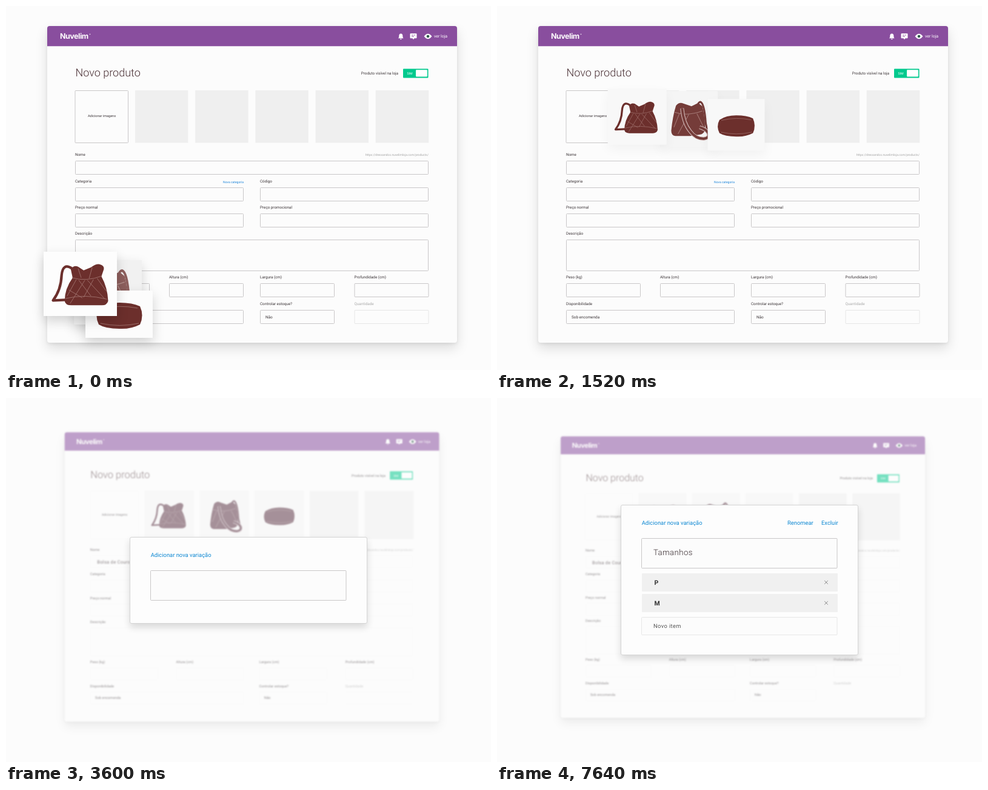
Recreate the animation shown at these times as an HTML page. Size 800x600 px, loop 8 s.

```html
<!DOCTYPE html>
<html lang="pt">
<head>
<meta charset="utf-8">
<title>Novo produto</title>
<style>
html, body { margin: 0; width: 100%; height: 100%; overflow: hidden; background: #fcfcfc; }
#stage { position: absolute; left: 0; top: 0; width: 800px; height: 600px; overflow: hidden; background: #fcfcfc; }
#form, #ui, #modal { position: absolute; left: 0; top: 0; width: 800px; height: 600px; }
#form { transform-origin: 402px 305px; }
#win { position: absolute; left: 68px; top: 33px; width: 676px; height: 522px; border-radius: 4px;
  background: #fcfcfc; box-shadow: 0 9px 20px rgba(0,0,0,.13), 0 2px 5px rgba(0,0,0,.07); }
svg { display: block; overflow: visible; }
text { font-family: Roboto, Arial, sans-serif; text-rendering: geometricPrecision; white-space: pre; }
.field { stroke-opacity: var(--line, 1); }
.card { position: absolute; left: 0; top: 0; }
.card svg { position: absolute; left: 50%; top: 50%; transform: translate(-50%, -50%); }
#panel { position: absolute; left: 204px; width: 390px; border: 1px solid #d4d4d4; border-radius: 3px;
  background: #fdfdfd; box-shadow: 0 6px 12px rgba(0,0,0,.14); }
#panel svg { position: absolute; left: -205px; top: -1px; }
</style>
</head>
<body>
<div id="stage">
  <div id="form">
    <div id="win"></div>
    <svg id="ui" viewBox="0 0 800 600"></svg>
  </div>
  <div id="modal"><div id="panel"></div></div>
</div>
<script>
const LOOP = 8000, STEP = 40;
const $ = id => document.getElementById(id);
const clamp = v => Math.min(1, Math.max(0, v));
const span = (t, a, b) => clamp((t - a) / (b - a));
const mix = (a, b, k) => a + (b - a) * k;
const inOut = (k, p) => k < .5 ? (2 * k) ** p / 2 : 1 - (2 - 2 * k) ** p / 2;
const sine = k => (1 - Math.cos(Math.PI * k)) / 2;

const text = (x, y, s, size = 6.3, fill = '#3c3538', more = '') =>
  `<text x="${x}" y="${y}" font-size="${size}" fill="${fill}" ${more}>${s}</text>`;
const rect = (x, y, w, h, fill, more = '') =>
  `<rect x="${x}" y="${y}" width="${w}" height="${h}" fill="${fill}" ${more}/>`;
const field = (x, y, w, h, line = '#c9c7c8') =>
  rect(x + .5, y + .5, w - 1, h - 1, '#fcfcfc', `class="field" rx="1" stroke="${line}"`);
const END = 'text-anchor="end"', MID = 'text-anchor="middle"';

// Form
const slotX = i => 113.7 + 99.2 * i;
function header() {
  return `<path d="M68 66.300V37q0-4 4-4h668q4 0 4 4v29.300z" fill="#894e9e"/>` +
    `<text x="89" y="54.2" font-size="12.5" font-weight="700" fill="#fff" letter-spacing="-.5" style="font-family:Inter,sans-serif">Nuvelim</text>` +
    `<circle cx="138.5" cy="46.5" r=".8" fill="#fff"/>` +
    `<path d="M647 53.3q1.300-1.300 1.300-4.300 0-3.500 3-3.500t3 3.500q0 3 1.300 4.300zM649.800 54h3q-.3 1.200-1.500 1.200t-1.500-1.200z" fill="#fff"/>` +
    `<path d="M667.500 45.300h9q1 0 1 1v6q0 1-1 1h-3l-1.500 2-1.500-2h-3q-1 0-1-1v-6q0-1 1-1z" fill="#fff"/>` +
    `<path d="M669 48h2.500M672.500 48h2.500M669 50.200h4" stroke="#894e9e" stroke-width=".9"/>` +
    `<path d="M689.500 50q6.500-8.500 13 0-6.500 8.500-13 0z" fill="#fff"/><circle cx="696" cy="50" r="2.300" fill="#2f5a4c"/>` +
    text(706, 52.3, 'ver loja', 6.9, '#fff');
}
function form() {
  let s = header() + text(114.5, 116, 'Novo produto', 18, '#4a3035', 'font-weight="300"') +
    text(647, 113, 'Produto visível na loja', 6.3, '#3c3538', END) +
    rect(655, 103.5, 41.5, 15, '#00c98d', 'rx="1"') + rect(676, 105.2, 18.9, 11.4, '#fff', 'rx="1"') +
    text(666, 113, 'SIM', 5.2, '#fff', MID) +
    field(113.5, 139, 88.5, 87) + text(158, 183, 'Adicionar imagens', 5.55, '#3c3538', MID);
  for (let i = 1; i < 6; i++) s += rect(slotX(i), 139, 87.5, 86.5, '#efefef');
  [[114, 246.8, 'Nome'], [114, 290.8, 'Categoria'], [419, 290.8, 'Código'], [114, 334, 'Preço normal'],
   [419, 334, 'Preço promocional'], [114, 377, 'Descrição'], [114, 449.2, 'Peso (kg)'],
   [269, 449.2, 'Altura (cm)'], [419, 449.2, 'Largura (cm)'], [574.5, 449.2, 'Profundidade (cm)'],
   [114, 492.8, 'Disponibilidade'], [419, 492.8, 'Controlar estoque?']].forEach(a => s += text(...a));
  s += text(574.5, 492.8, 'Quantidade', 6.3, '#aaa') +
    text(697, 247, 'https://dressandco.nuvelimloja.com/products/', 5.02, '#a3a3a3', END) +
    text(392, 291.6, 'Nova categoria', 5.05, '#1580d8', END);
  s += field(114, 255, 583, 23) + field(114, 385, 583, 52);
  for (const x of [114, 419]) for (const y of [299, 342]) s += field(x, y, 278, 23);
  for (const x of [114, 269, 419, 574.5]) s += field(x, 457, 123, 23);
  s += field(114, 501, 278, 23) + field(419, 501, 123, 23) + field(574.5, 501, 123, 23, '#e6e6e6');
  return s + text(123, 514.5, 'Sob encomenda', 6.4) + text(428, 514.5, 'Não', 6.4) +
    text(126.5, 269.8, '', 8.4, '#33262a', 'id="name" letter-spacing=".25"');
}
$('ui').innerHTML = form();

// Bags
const BROWN = '#6c2f2c', SEAM = 'fill="none" stroke="#a0726e" stroke-width=".9"';
const strap = (d, w, color = BROWN) =>
  `<path d="${d}" fill="none" stroke="${color}" stroke-width="${w}" stroke-linejoin="round"/>`;
const shape = d => `<path d="${d}" fill="${BROWN}"/>`;
const bucket = strap('M35 9Q20-1 18 20Q17 44 4 61L25 60', 4.2) +
  shape('M23 62Q23 42 36 24L33 10Q38 3 45 6L54 12 66 7Q74 1 80 2 88 4 87 10L83 22Q93 40 94 62 92 69 84 69L34 69Q24 69 23 62z') +
  `<path d="M35 24Q58 31 84 21M42 27L27 54M56 28L32 66M70 27L54 56M46 28L66 54M60 28L88 58M76 25L91 46M30 44L52 57M24 58Q56 50 92 59M45 9L50 24M68 7L63 25" ${SEAM}/>`;
const LOOP_STRAP = 'M16 12Q18 34 28 46 36 57 48 57 57 56 55 49 52 43 42 40';
const sling = strap('M36 30Q37 3 43 2.500 49 4 51 34L54 48', 3) +
  shape('M7 8Q12 2 18 5L30 9 40 4 46 9Q50 24 50 43 49 50 42 51L28 53 6 53Q0 52 0 45 2 24 7 8z') +
  `<path d="M5 18Q25 24 46 16M12 20L4 40M26 21L10 50M38 20L48 40" ${SEAM}/>` +
  strap(LOOP_STRAP, 5.4, '#d3b9b7') + strap(LOOP_STRAP, 3.6);
const barrel = shape('M4 9Q18 0 38 0 60 0 72 6 79 21 72 36 57 44 38 43 15 43 4 36-3 22 4 9z') +
  `<path d="M8 10Q38 3 68 9M7 34Q38 41 70 34" ${SEAM}/>`;

// Cards: centre, size, art and its box, bag widths, bag offset, shades, slot
const cards = [
  { x: 168, y: 472, w: 112, h: 106, art: sling, box: [57, 59], bag: [80, 57], off: [3, 2], shade: [241, 246], fade: .75, slot: 2 },
  { x: 186.5, y: 508, w: 111, h: 78, art: barrel, box: [76, 44], bag: [76, 56], off: [0, 3], shade: [252, 246], fade: 1, slot: 3 },
  { x: 122.5, y: 458, w: 121, h: 106, art: bucket, box: [94, 70], bag: [95, 64], off: [-2, 1], shade: [253, 246], fade: 1, slot: 1 }
];
for (const c of cards) {
  c.el = document.createElement('div');
  c.el.className = 'card';
  c.el.innerHTML = `<svg viewBox="0 0 ${c.box.join(' ')}">${c.art}</svg>`;
  c.svg = c.el.firstChild;
  c.svg.style.margin = `${c.off[1]}px 0 0 ${c.off[0]}px`;
  $('form').append(c.el);
}
function drawCards(t, dim) {
  const u = span(t, 80, 1200), dx = 36 * u * u;
  const dy = -276 * inOut(span(t, 200, 1780), 4);
  const q = inOut(span(t, 1200, 1720), 2.5), grow = 1 + .025 * u;
  for (const c of cards) {
    const w = mix(c.w * grow, 87.5, q), h = mix(c.h * grow, 86.5, q);
    const x = mix(c.x + dx, slotX(c.slot) + 43.75, q), y = mix(c.y + dy, 182.25, q);
    const g = Math.round(mix(...c.shade, q)), bag = mix(c.bag[0] * grow, c.bag[1], q);
    const st = c.el.style;
    st.width = w + 'px';
    st.height = h + 'px';
    st.transform = `translate(${x - w / 2}px, ${y - h / 2}px)`;
    st.background = `rgb(${g},${g},${g})`;
    st.boxShadow = `0 8px 18px rgba(0,0,0,${.17 * (1 - q)})`;
    c.svg.style.width = bag + 'px';
    c.svg.style.height = bag * c.box[1] / c.box[0] + 'px';
    c.svg.style.opacity = mix(c.fade, 1, q);
    c.svg.style.filter = dim ? `saturate(${1 - .4 * dim}) hue-rotate(${-30 * dim}deg)` : 'none';
  }
}

// Dialog
const BLUE = '#0c87d2';
let shown = '';
function drawPanel(items, entry) {
  const key = items + '|' + entry;
  if (key === shown) return;
  shown = key;
  const n = entry ? items.length : -1, h = 178 + 35 * n;
  let s = text(238.7, 33.3, 'Adicionar nova variação', 9.4, BLUE) + field(238, 55, 323.5, 50);
  if (entry) {
    s += text(479, 33.3, 'Renomear', 9.4, BLUE) + text(535, 33.3, 'Excluir', 9.4, BLUE) +
      text(258, 82.8, 'Tamanhos', 13.2, '#33262a', 'font-weight="300" letter-spacing=".4"');
    [...items].forEach((name, i) => {
      const y = 113 + 34 * i;
      s += rect(239, y, 323, 30, '#f0f0f0', 'rx="1"') +
        text(259.5, y + 18.6, name, 10.5, '#333', 'font-weight="700"') +
        `<path d="M540.200 ${y + 12}l5.600 5.600m0-5.600l-5.600 5.600" stroke="#888" stroke-width="1"/>`;
    });
    const y = 113 + 36 * n;
    s += field(238, y, 323.5, 30, '#e7e7e7') + text(258, y + 17.8, entry, 9.3, '#555', 'letter-spacing=".4"');
  }
  const st = $('panel').style;
  st.top = 300 - h / 2 + 'px';
  st.height = h - 2 + 'px';
  $('panel').innerHTML = `<svg width="800" height="${h}">${s}</svg>`;
}

const NAME = 'Bolsa de Couro Marrom';
const states = [[0, '', ''], [4720, '', 'Novo item'], [5520, '', 'P'], [6320, 'P', 'Novo item'],
  [7000, 'P', 'M'], [7640, 'PM', 'Novo item']];

function draw(t) {
  const zoom = sine(span(t, 2900, 3920)), dim = sine(span(t, 2900, 3400));
  drawCards(t, dim);
  $('name').textContent = NAME.slice(0, Math.ceil(NAME.length * span(t, 2080, 2320)));
  const st = $('form').style;
  st.transform = zoom ? `scale(${1 - .111 * zoom})` : 'none';
  st.filter = dim ? `blur(${1.3 * dim}px)` : 'none';
  st.opacity = 1 - .47 * dim;
  st.setProperty('--line', 1 - .95 * dim);
  $('modal').style.opacity = sine(span(t, 2960, 3360));
  const [, items, entry] = states.filter(s => s[0] <= t).pop();
  drawPanel(items, entry);
}

const start = performance.now();
function tick() {
  const t = (performance.now() - start) % LOOP;
  draw(Math.floor(t / STEP) * STEP);
  requestAnimationFrame(tick);
}
tick();
</script>
</body>
</html>
```
